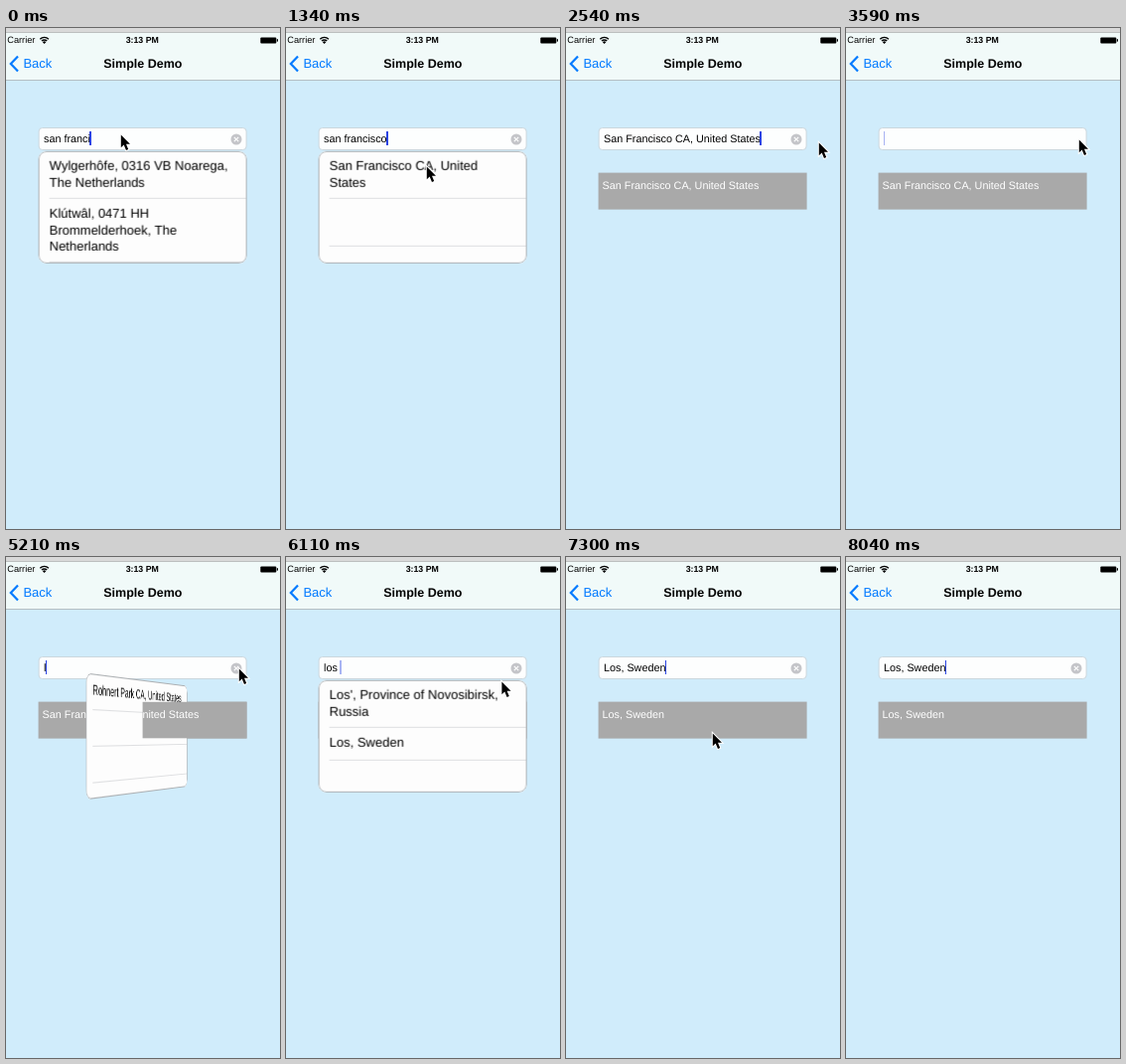
An HTML page that plays this animation: 276 px wide and 504 px high, repeating every 8470 ms.

```html
<!DOCTYPE html>
<html lang="en">
<head>
<meta charset="utf-8">
<title>Simple Demo</title>
<style>
  html, body { margin: 0; width: 100%; height: 100%; overflow: hidden; }
  body {
    position: relative; background: #d0ecfb; color: #000;
    font-family: "Liberation Sans", Arial, sans-serif;
    text-rendering: geometricPrecision;
  }
  body > * { position: absolute; box-sizing: border-box; }
  .text { line-height: 16px; white-space: pre; }

  #bar {
    left: 0; top: 0; width: 100%; height: 53px;
    background: #f1faf9; border-top: 4px solid #d9d9d9; border-bottom: 1px solid #b5bfc3;
    box-shadow: inset 0 1px #bcbfbf;
  }
  #icons { left: 0; top: 0; }
  #carrier { left: 1.3px; top: 4px; font-size: 9.2px; }
  #clock { left: 0; width: 274.5px; top: 4px; font-size: 8.8px; font-weight: bold; text-align: center; }
  #title { left: 0; width: 275.6px; top: 28px; font-size: 12.5px; font-weight: bold; text-align: center; }
  #back { left: 17.4px; top: 28.4px; font-size: 13px; color: #007aff; }

  #field {
    left: 33px; top: 100px; width: 210px; height: 23px; transform: translate(-.4px, 0);
    background: #fdfefe; border: 1px solid #cbd7de; border-radius: 4px;
  }
  #input { left: 38px; top: 103.5px; font-size: 10.8px; display: flex; }
  #caret { width: 1.5px; height: 14px; margin: .5px 0 0 -.5px; background: #2a44e2; }
  #clear { left: 226px; top: 106px; }

  .label {
    left: 33px; top: 146px; width: 210px; height: 37px; padding: 5px 4px;
    transform: translate(-.4px, -.4px);
    background: #a9a9a9; color: #fff; font-size: 10.8px;
  }
  #front { clip-path: inset(0 0 0 105px); }

  #popup {
    left: 33px; top: 124px; width: 210px; height: 112.5px;
    overflow: hidden; border-radius: 8px; background: #fdfdfd; font-size: 13px;
  }
  #popup::after {
    content: ""; position: absolute; inset: 0;
    border: 1px solid #adb1b4; border-radius: 8px;
  }
  .row {
    position: relative; box-sizing: border-box; min-height: 33px;
    padding: 7.4px 0 8px 11px; line-height: 16.3px; white-space: pre;
  }
  .row::after {
    content: ""; position: absolute; left: 11px; right: 0; bottom: 0;
    height: 1px; background: #dedfe1;
  }
  .row.on { background: #d8d8d8; }
  #mouse { left: 0; top: 0; overflow: visible; }
</style>
</head>
<body>
  <div id="bar"></div>
  <svg id="icons" width="276" height="53" fill="none" stroke-linecap="butt">
    <path d="M34.3 11.2a6 6 0 0 1 8.6 0M36 13.1a3.6 3.6 0 0 1 5.2 0" stroke="#000" stroke-width="1.4"/>
    <path d="M36.9 14.2a2.3 2.3 0 0 1 3.4 0l-1.7 1.8z" fill="#000"/>
    <rect x="256.3" y="9.4" width="16" height="6" rx="1" fill="#000"/>
    <rect x="272.8" y="11.2" width="1.2" height="2.4" fill="#000"/>
    <path d="M12 28.5L4.8 36l7.2 7.5" stroke="#007aff" stroke-width="2.2"/>
  </svg>
  <div id="carrier" class="text">Carrier</div>
  <div id="clock" class="text">3:13 PM</div>
  <div id="back" class="text">Back</div>
  <div id="title" class="text">Simple Demo</div>

  <div id="field"></div>
  <div id="input" class="text"><span id="typed"></span><i id="caret"></i></div>
  <svg id="clear" width="12" height="12">
    <circle cx="6" cy="6" r="5.5" fill="#c4c5c9"/>
    <path d="M3.8 3.8l4.4 4.4M8.2 3.8L3.8 8.2" stroke="#fff" stroke-width="1.2"/>
  </svg>

  <div id="label" class="label text"></div>
  <div id="popup"></div>
  <div id="front" class="label text"></div>

  <svg id="mouse" width="12" height="19">
    <path d="M.8 1.4V14.2L3.7 11.5L6 17L8.2 16L6 10.7H10Z" fill="#000" stroke="#fff" stroke-width="2" paint-order="stroke"/>
  </svg>

<script>
  const LOOP = 8470, TICK = 148.8;   // the screen refreshes once per tick
  const FLIP = 2.02;                 // flip length in ticks
  const $ = id => document.getElementById(id);

  // Timelines: [tick, value]
  const CITY = "San Francisco CA, United States", TOWN = "Los, Sweden";
  const typing = [
    [0, "san franci"], [1, "san francis"], [2, "san francisc"], [3, "san francisco"],
    [11, CITY], [20, ""], [34, "l"], [36, "lo"], [37, "los"], [38, "los "], [47, TOWN]
  ];
  const results = [
    [0, ["Wylgerhôfe, 0316 VB Noarega,\nThe Netherlands",
         "Klútwâl, 0471 HH\nBrommelderhoek, The\nNetherlands"]],
    [2, ["San Francisco CA, United\nStates"]],
    [20, ["Rohnert Park CA, United States"]],
    [38, ["Los', Province of Novosibirsk,\nRussia", TOWN]]
  ];
  const picked = [[0, -1], [10, 0], [20, -1], [47, 1]];
  const chosen = [[0, ""], [11, CITY], [47, TOWN]];
  const blink = [
    [0, 1], [24, .4], [25, 0], [27, .4], [28, 1], [31, .4], [32, 0],
    [34, 1], [41, .4], [42, 0], [44, .4], [45, 1]
  ];
  const flips = [[10.6, 0, 90], [34.24, 90, 0], [46.6, 0, 90]];
  const path = [
    [0, 115, 106], [5, 115, 106], [9, 141, 138], [13, 141, 138], [17, 254, 114],
    [19, 234, 111], [40, 234, 111], [45, 147, 176], [49, 147, 176], [54, 205, 510], [60, 205, 510]
  ];

  const at = (list, n) => list.findLast(e => e[0] <= n)[1];
  const ease = p => p * p * (3 - 2 * p);

  function angle(n) {
    const [start, from, to] = flips.findLast(f => f[0] <= n) || [0, 0, 0];
    return from + (to - from) * ease(Math.min(1, (n - start) / FLIP));
  }

  function pointer(n) {
    const i = path.findLastIndex(p => p[0] <= n);
    const [t0, x0, y0] = path[i], [t1, x1, y1] = path[i + 1];
    const p = (n - t0) / (t1 - t0);
    return [x0 + (x1 - x0) * p, y0 + (y1 - y0) * p];
  }

  function fillRows(rows, on) {
    const blank = rows[0].replace(/[^\n]+/g, " ");
    $("popup").replaceChildren(...[...rows, blank, blank, blank].map((text, i) => {
      const row = document.createElement("div");
      row.className = i === on ? "row on" : "row";
      row.textContent = text;
      return row;
    }));
  }

  const show = (id, yes) => $(id).style.visibility = yes ? "visible" : "hidden";

  function draw(n) {
    const text = at(typing, n), choice = at(chosen, n), turn = angle(n);
    const [x, y] = pointer(n);

    $("typed").textContent = text;
    $("caret").style.opacity = at(blink, n);
    show("clear", text);

    $("label").textContent = $("front").textContent = choice;
    show("label", choice);
    // The far half of the turning list passes behind the label
    show("front", choice && turn > 0 && turn < 90);

    fillRows(at(results, n), at(picked, n));
    $("popup").style.transform = `translate(-.4px, -.2px) perspective(800px) rotateY(${turn}deg)`;
    show("popup", turn < 90);

    $("mouse").style.transform = `translate(${x}px, ${y}px)`;
  }

  let last = -1;
  function loop() {
    const n = Math.floor(performance.now() % LOOP / TICK);
    if (n !== last) draw(last = n);
    requestAnimationFrame(loop);
  }
  loop();
</script>
</body>
</html>
```
